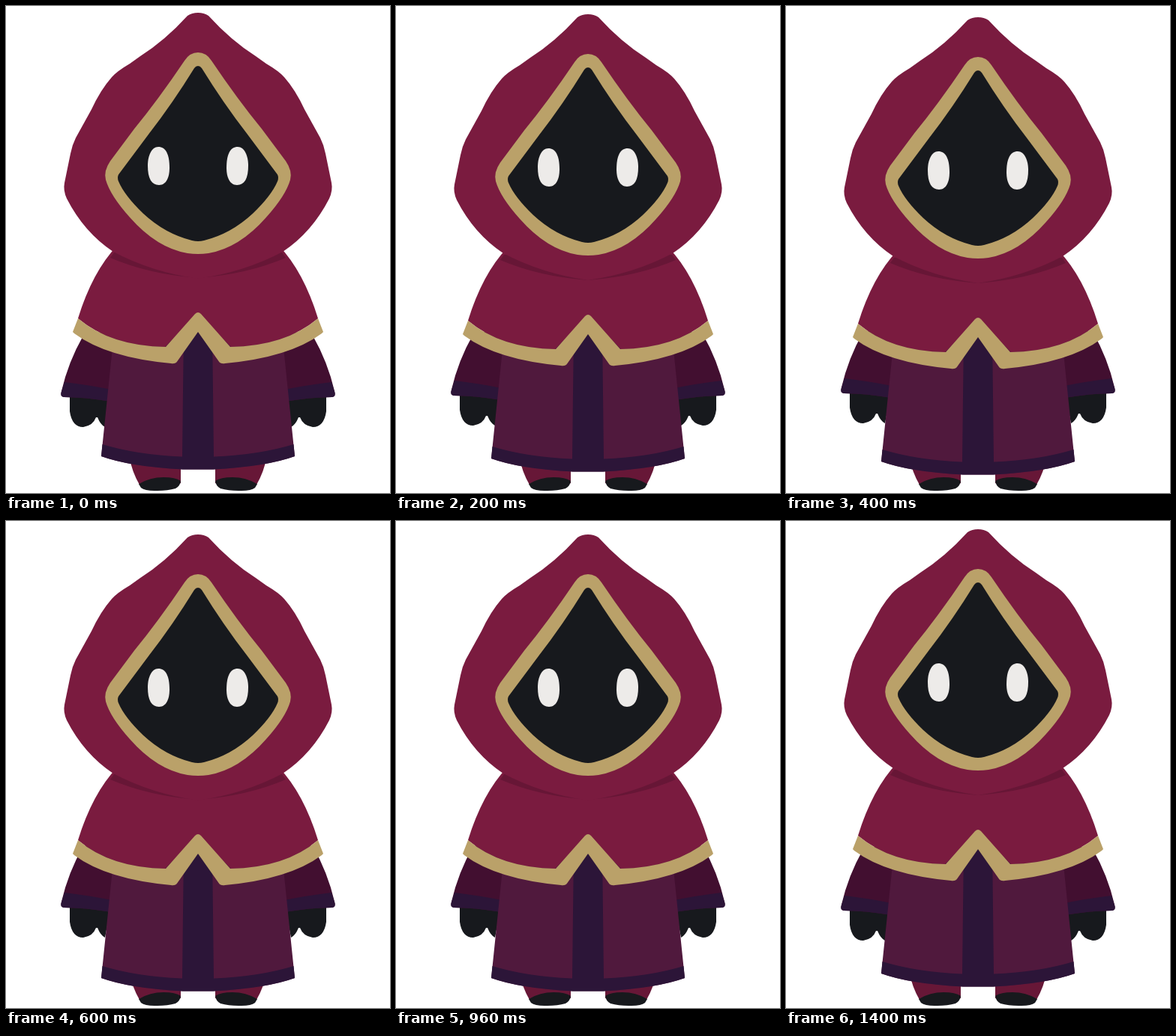
Recreate the animation shown at these times as an HTML page with a canvas. Size 512 px wide and 650 px high, loop 1.6 s.

```html
<!DOCTYPE html>
<html lang="en">
<head>
<meta charset="utf-8">
<title>Hooded mage, idle</title>
<style>
html, body { margin: 0; height: 100%; overflow: hidden; background: #fff; }
canvas { display: block; }
</style>
</head>
<body>
<canvas id="stage" width="512" height="650"></canvas>
<script>
const ctx = document.getElementById('stage').getContext('2d');
const RED = '#7a1b3f', GOLD = '#baa169', BLACK = '#17191d', INDIGO = '#2c1538';

// Right halves of each shape, x measured from the centre line, back to front.
const parts = [
  // legs and shoes
  ['feet', '#671737', 'M23 600H92Q88 622 78 639L23 637Z'],
  ['feet', BLACK, 'M79 638Q64 629 46 629Q30 629 23 634Q24 641 30 644Q42 647.5 58 647Q71 647 76 643Z'],
  // hand, sleeve and cuff
  ['arms', BLACK, 'M171 515V541Q168 562 153 562Q140 560 136 549H134Q130 559 124 562L115 515Z'],
  ['arms', '#420f30', 'M153 440Q173 475 182 514Q184 521 179 522Q150 522 116 528L106 430Z'],
  ['arms', INDIGO, 'M178 502Q145 506 115 512V528Q150 522 179 522Q184 521 182.5 516Z'],
  // robe with hem and centre strip
  ['robe', '#50193d', 'M0 430H113L115 465L129 601Q90 615 20 618.5H0Z'],
  ['robe', INDIGO, 'M127.5 585Q82 599 21 601.5L19 430H0V618.5H20Q90 615 129 601Z'],
  // cape, its trim and the shadow below the hood
  ['cape', RED, 'M0 320H108Q141 355 160 417Q116 454 44 455L0 410Z'],
  ['cape', GOLD, 'M160 417L167 435L165 437Q122 469 36 477Q30 478 27.5 474L0 435V409Q2 409 4 411L43 455Q116 454 160 417Z'],
  ['cape', '#671636', 'M0 330L112 329L117 336Q66 358 0 363Z'],
  // hood, trim, face and eye
  ['hood', RED, 'M0 9Q8 9 14 13Q44 46 77 67L91 77Q108 87 115 95Q130 112 142 138L163 176Q168 186 170 197L178 236Q180 246 175 257Q152 302 113 328Q62 355 0 364Z'],
  ['hood', GOLD, 'M0 62Q11 62 18 73Q53 125 85 164L117 207Q126 220 123 232Q117 253 91 282Q55 323 14 330Q7 331 0 331Z'],
  ['hood', BLACK, 'M0 80Q3 80 5 83Q34 130 65 170L106 225Q108 229 106 234Q98 253 73 277Q44 304 8 313Q4 314 0 314Z'],
  ['hood', '#edebe9', 'M53 188C62 188 67 200 67 213C67 230 62 239 52 239C42 239 38 228 38 216C38 198 43 188 53 188Z']
].map(([group, color, d]) => [group, color, new Path2D(d)]);

// Vertical shift of each group as the breath sinks from rest to its lowest pose.
const shifts = {
  feet: [0, 0, 0, 0],
  arms: [0, -2, -5, -6],
  robe: [0, 3, 7, 9],
  cape: [0, 3, 7, 9],
  hood: [0, 2, 6, 9]
};
const breath = [0, 1, 2, 3, 3, 3, 2, 1];
const STEP = 200;

function draw(now) {
  const pose = breath[Math.floor(now / STEP) % breath.length];
  ctx.setTransform(1, 0, 0, 1, 0, 0);
  ctx.fillStyle = '#fff';
  ctx.fillRect(0, 0, 512, 650);
  for (const [group, color, path] of parts) {
    ctx.fillStyle = color;
    for (const side of [1, -1]) {
      ctx.setTransform(side, 0, 0, 1, 256, shifts[group][pose]);
      ctx.fill(path);
    }
  }
}

let start;
function tick(now) {
  start ??= now;
  draw(now - start);
  requestAnimationFrame(tick);
}
draw(0);
requestAnimationFrame(tick);
</script>
</body>
</html>
```
